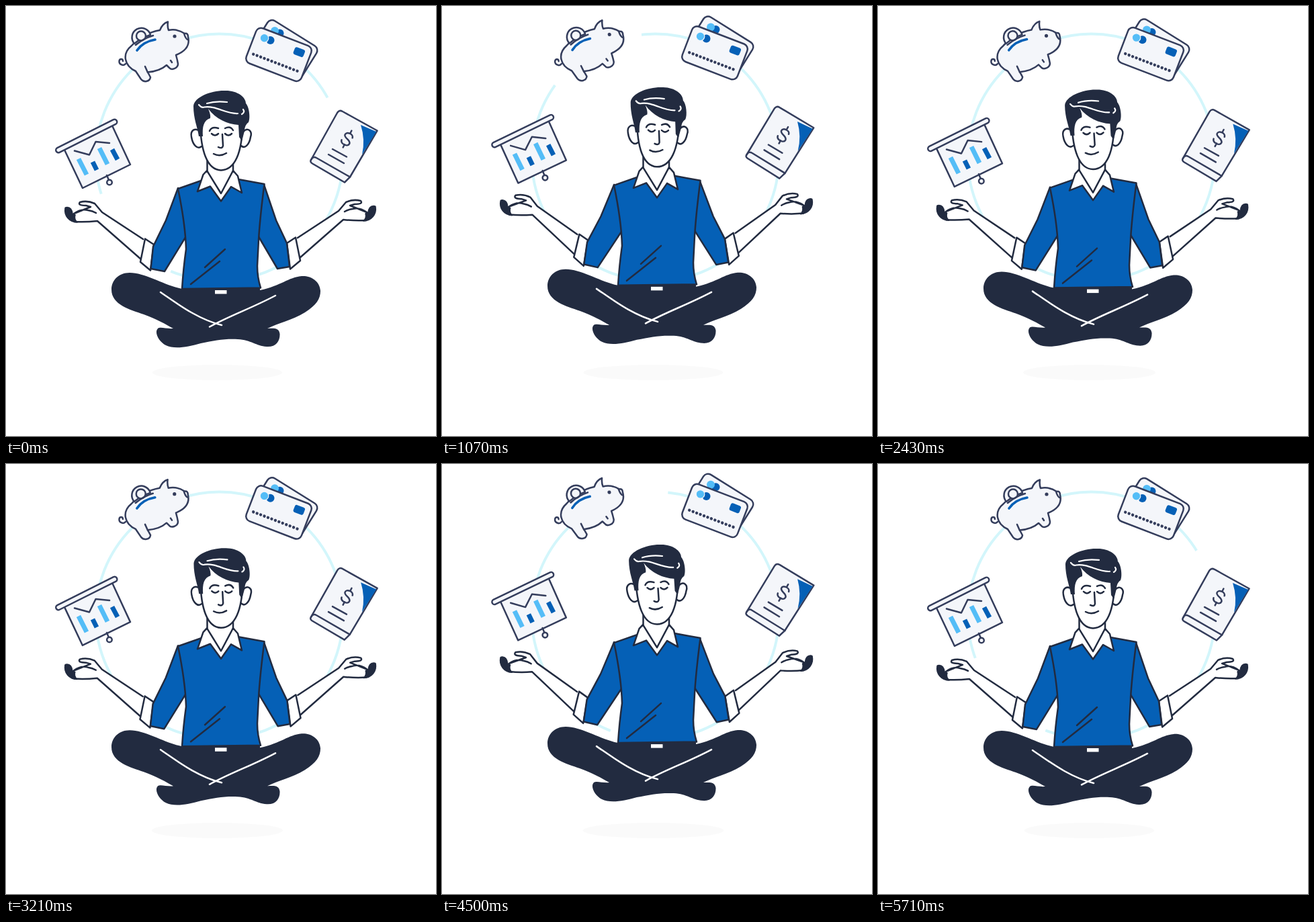
Write an HTML page that moves like this. It is 640 by 640 pixels and loops after 5.78 s.

```html
<!DOCTYPE html>
<html lang="en">
<head>
<meta charset="utf-8">
<title>Balanced finances</title>
<style>
html, body { margin: 0; height: 100%; overflow: hidden; background: #fff }
svg { display: block; width: 100vw; height: 100vh }
path, line, rect, circle, g { stroke-linecap: round; stroke-linejoin: round }
.item { fill: #f4f6fa; stroke: #343d5c; stroke-width: 2.5 }
.man { fill: #fff; stroke: #222b40; stroke-width: 2.5 }
.blue { fill: #0560b6 }
.dark { fill: #222b40 }
.sky { fill: #54bdf7 }
.flat { stroke: none }
.open { fill: none }
.shine { fill: none; stroke: #fff }
.bar { stroke-width: 7; stroke-linecap: butt }
.gap { fill: none; stroke: #fff; stroke-width: 7; stroke-linecap: butt }
</style>
</head>
<body>
<svg viewBox="0 0 640 640">
  <circle cx="317.5" cy="225.5" r="184" fill="none" stroke="#d3f6fb" stroke-width="4"/>
  <path class="gap" id="gapRight"/>
  <path class="gap" id="gapLeft"/>
  <ellipse id="shadow" cx="314.5" cy="545.5" ry="11.5" fill="#fafafa"/>

  <g class="item" id="chart">
    <path d="M86 212L158 178L185 236L114 271Z"/>
    <path d="M78 214.5L161.500 172.500" stroke-width="10"/>
    <path d="M78 214.5L161.500 172.500" stroke="#f4f6fa" stroke-width="5"/>
    <path class="open" d="M102 215.500L124 221.500L133.500 202L154 204M150 252L153 259"/>
    <circle cx="154" cy="262.5" r="3.8"/>
    <path class="bar" stroke="#54bdf7" d="M108 227.500L120 251M139 211.500L151 235.500"/>
    <path class="bar" stroke="#0560b6" d="M129 232L135 244M158 213.500L166 228.500"/>
  </g>

  <g class="item" id="pig">
    <path class="open" d="M178 86C175 90 168 87 168.500 82C169 78 174 78 174 82"/>
    <path d="M187 59C197 48 212 39 229 36Q233 26 241 23.500Q240 31 242 36C252 34 260 37 266 41Q271 40 271 46C274 58 268 67 253 73Q255 80 256 86C256 93 246 96 243 92L239 88Q229 97 211 98.500L215 106C214 113 205 114 201 109L193 97C176 89 172 71 187 59Z"/>
    <path d="M191 56A14 14 0 1 1 215 43Q202 47 191 56Z"/>
    <circle cx="201" cy="44.500" r="7"/>
    <path class="open" d="M265 41Q267 48 270 50M207 90L211 99M245 81L247 84M193 58Q205 48 219 44"/>
    <path class="open" d="M195 66Q204 53 222 50" stroke="#0560b6" stroke-width="3.600"/>
    <circle class="flat" cx="251" cy="45" r="2.6" fill="#343d5c"/>
  </g>

  <g class="item" id="backCard">
    <rect x="-43" y="-28" width="86" height="56" rx="8" transform="translate(415 64.500) rotate(32)"/>
    <circle class="blue flat" cx="407.500" cy="40.500" r="6"/>
    <circle class="sky flat" cx="400" cy="37" r="6"/>
  </g>
  <g class="item" id="frontCard">
    <g transform="translate(406 72.300) rotate(21)">
      <rect x="-44" y="-28" width="88" height="56" rx="8"/>
      <rect class="blue flat" x="19" y="-20" width="16" height="11.500" rx="3"/>
      <path class="open" d="M-35.500 13H35" stroke-width="4.400" stroke-dasharray="0 5.830"/>
    </g>
    <circle class="blue flat" cx="393.500" cy="51" r="6"/>
    <circle cx="384.500" cy="47.800" r="6.300" fill="#54bdf7" stroke="#f4f6fa" stroke-width="1.200"/>
  </g>

  <g class="item" id="book">
    <path d="M454 229L493 159Q496 154 501 157L552.500 185.500L512 254.500L504 262.500L456 234.500Q452 232 454 229Z"/>
    <path class="open" d="M454 229Q457 223 462 226L512 254.500"/>
    <path class="blue flat" d="M528 177L551 187L530 221Q535 199 528 177Z"/>
    <path class="open" d="M486 213L507 224.500M480 221L503 234"/>
    <path class="open" transform="translate(508 198) rotate(27)" d="M6-5C5-11-7-10-6-4C-5 1 6-1 6 5C6 11-6 11-7 5M0-14V-9M0 9V14"/>
  </g>

  <g class="man" id="body">
    <g id="leftArm">
      <g id="forearm">
        <path class="flat" d="M132 294L143 307L206 349L201 377L136 320L104 321L100 309L126 298Z"/>
        <path class="open" d="M204 347L143 307L132 294Q121 289 110 292Q106 297 119 297L126 299L101 309Q112 301 122 304Q129 305 134 308M201 377L136 320Q118 322 102 321"/>
        <path class="dark" stroke-width="1.500" d="M88 301C86 312 94 322 106 322Q101 317 103 311L99 309Q98 300 91 299.500Q88 299.500 88 301Z"/>
        <path d="M207 346.500L220 355L215 393.500L200 381Z"/>
      </g>
      <path class="blue" d="M256 271L238 319L219 358L215.500 391L236 395L274 333L285 300Z"/>
    </g>
    <g id="rightArm">
      <use href="#forearm" transform="translate(638 -2) scale(-1 1)"/>
      <path class="blue" d="M384 266L402 319L418 353L422 388L404 391L367 328L360 300Z"/>
    </g>
    <path class="dark flat" d="M262 421C236 416 208 397 184 397C168 397 157 408 157 422C157 445 185 452 205 459C225 466 238 474 249 480C239 481 230 477 226 480C220 486 228 500 238 505C250 511 270 508 290 502C310 498 325 495 345 496C365 497 372 506 388 507C402 508 408 498 407.500 488C406 478 398 480 389 480C405 472 425 468 445 456C462 445 468 436 468 424C467 408 452 401 440 402C420 404 410 416 378 423V418H262Z"/>
    <path class="shine" d="M230 426C255 443 285 466 321 475M303 477.500C335 460 365 450 401 431"/>
    <path class="blue" d="M256 272L296 258H346L384.500 265Q378 315 376 348L374 387Q374 404 379 419.500L262 421Q264 390 268 362Q267 325 256 272Z"/>
    <rect class="flat" x="311" y="423" width="17.500" height="5.500"/>
    <path class="open" d="M275 414L318 380M296 389L326 362"/>
    <path class="flat" d="M299 225H338V250L320 285L299 250Z"/>
    <path class="open" d="M299.500 230V248M338 230V248"/>
    <path d="M299 245L293.500 251L285 276L304 268.500L320 290.500L335 269L351 278L345 253L338 245L320 279Z"/>
    <g id="head">
      <path d="M290 187C281 180 274 185 276 195C278 207 285 214 291 209M353 187C360 180 367 186 364 195C362 207 355 213 350 208"/>
      <path d="M289 175C290 215 299 244 320 244.500C340 244 352 220 352 172L330 145H297Z"/>
      <path class="dark flat" d="M287 194C285 180 279 168 279 149C280 135 307 125 327 126C345 126 357 136 357 145C362 150 364 167 361 173Q355 177 355 186L351 201L347 195L346 177C330 176 312 168 301 153Q305 162 304 167C294 170 292 180 293 194Z"/>
      <path class="shine" stroke-width="2.200" d="M287 147Q291 152 295 150.500C313 148 327 161 345 160M299 145Q312 141 329 143M351 161Q356 158 353 154"/>
      <path class="open" d="M303 186Q306 179 316 182M326 182Q334 178 338 185M306 190Q311 195 316 190M326 190Q331 195 336 190M322 191L323 208Q322 213 316 210M309 220Q318 225 328 219"/>
    </g>
  </g>
</svg>
<script>
const LOOP = 5780, BOB = LOOP / 2;
const find = id => document.getElementById(id);
const place = (id, value) => find(id).setAttribute('transform', value);

// Interpolates between [time, value] keys.
function track(keys, time, ease = u => u) {
  if (time <= keys[0][0]) return keys[0][1];
  for (let i = 1; i < keys.length; i++) {
    const [t0, a] = keys[i - 1], [t1, b] = keys[i];
    if (time < t1) return a + (b - a) * ease((time - t0) / (t1 - t0));
  }
  return keys[keys.length - 1][1];
}
const smooth = u => u * u * (3 - 2 * u);

const sway = [[0, 0], [1000, 2], [1600, -1], [2400, -1], [BOB, 0]];

// Ring gap edges, in degrees clockwise from the top; times run past the loop end.
const gaps = {
  gapRight: {
    start: [[3300, -26], [4500, -22], [5710, 58.3], [5780, 61], [6500, 95]],
    end: [[3300, -26], [4500, 5.8], [5780, 92], [6500, 95]]
  },
  gapLeft: {
    start: [[3300, 178], [4500, 180], [5780, 203], [6850, 305.7], [7420, 335], [8100, 356]],
    end: [[3300, 178], [4500, 201.2], [5710, 249.8], [5780, 252.75], [6850, 353.6], [7420, 355.2], [8100, 356]]
  }
};

function ringPoint(degrees) {
  const a = degrees * Math.PI / 180;
  return `${317.5 + 184 * Math.sin(a)} ${225.5 - 184 * Math.cos(a)}`;
}

function render(t) {
  const lift = (1 - Math.cos(2 * Math.PI * t / BOB)) / 2;
  const move = (dy, angle = 0, x = 0, y = 0) =>
    `translate(0 ${dy * lift}) rotate(${angle * lift} ${x} ${y})`;

  place('body', move(-6.1));
  place('leftArm', move(0, 2.35, 255, 272));
  place('rightArm', move(0, -2.35, 384, 268));
  place('head', `rotate(${0.57 * track(sway, t % BOB, smooth)} 319 240)`);
  place('chart', move(-8.5, 1, 135, 225));
  place('pig', move(0, -2.5, 180, 92));
  place('backCard', move(-6.5));
  place('frontCard', move(-3));
  place('book', move(-7, 2.2, 503, 208));
  find('shadow').setAttribute('rx', 96.5 + 8.5 * lift);

  const ringTime = t < 3000 ? t + LOOP : t;
  for (const id in gaps) {
    const start = track(gaps[id].start, ringTime), end = track(gaps[id].end, ringTime);
    find(id).setAttribute('d', end - start < 0.1 ? '' :
      `M${ringPoint(start)}A184 184 0 0 1 ${ringPoint(end)}`);
  }
}

function tick() {
  render(performance.now() % LOOP);
  requestAnimationFrame(tick);
}
tick();
</script>
</body>
</html>
```
